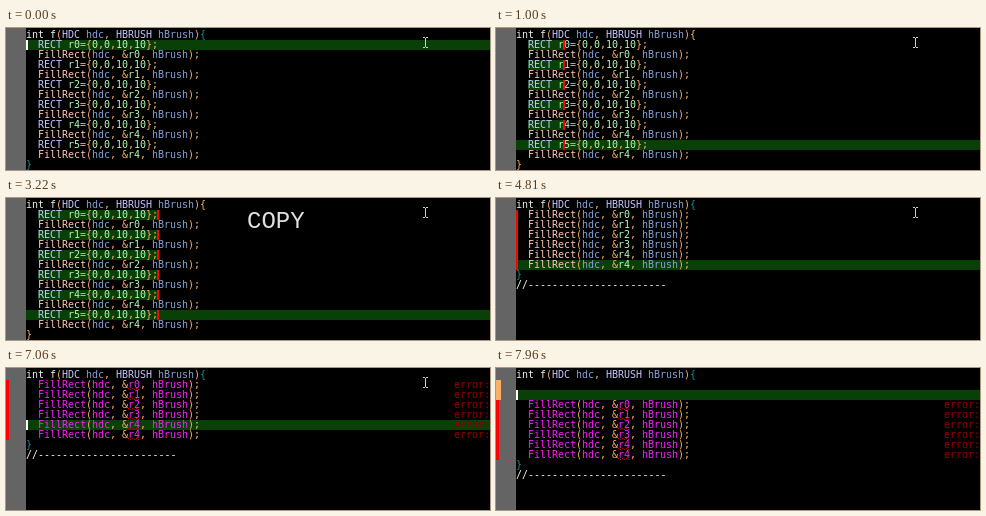
These frames come from a looping animation (484 px wide and 142 px high, 8 s). An HTML page with a canvas:

```html
<!DOCTYPE html>
<html lang="en">
<head>
<meta charset="utf-8">
<title>Multi-caret editing</title>
<style>
html, body { margin: 0; width: 484px; height: 142px; overflow: hidden; background: #000; }
canvas { display: block; }
</style>
</head>
<body>
<canvas id="stage" width="484" height="142"></canvas>
<script>
const ctx = document.getElementById('stage').getContext('2d');
const LOOP = 8000, BEAT = 100, BLINK = 516;
const CW = 6, RH = 10, LEFT = 20, TOP = 2;
const COPY = 1700, CUT = 4810, CHECK = 6000, MOVE = 7060, ENTER = 7660;
const GREEN = '#084008', RED = '#f00', ORANGE = '#f8b068', PINK = '#ffc8b8', LAVENDER = '#c4c4ff',
  WHITE = '#f0f0e8', BLUE = '#86a4d8', MINT = '#b4f8b4', MAGENTA = '#f820f8', TEAL = '#109090';

const head = 'int f(HDC hdc, HBRUSH hBrush){';
const rects = [0, 1, 2, 3, 4, 5].map(i => `  RECT r${i}={0,0,10,10};`);
const fills = [0, 1, 2, 3, 4, 4].map(i => `  FillRect(hdc, &r${i}, hBrush);`);
const tail = ['}', '//' + '-'.repeat(23)];

// Moves from a to b in whole cells, one key press per beat after the start.
function keys(t, start, count, a, b) {
  const pressed = Math.min(count, Math.max(0, Math.floor((t - start) / BEAT)));
  return a + Math.floor((b - a) * pressed / count);
}

function caretAt(t) {
  if (t < CUT) {
    return {
      row: keys(t, 400, 5, 1, 11),
      col: t < BEAT ? 0 : keys(t, BEAT, 3, 2, 6) + keys(t, 900, 7, 0, 16)
    };
  }
  const up = keys(t, MOVE - BEAT, 5, 6, 1);
  return { row: up + blanksAt(t) - keys(t, ENTER + BEAT, 1, 0, 1), col: 0 };
}

const blanksAt = t => keys(t, ENTER - BEAT, 2, 0, 2);
const bracesMatched = t => t < BEAT || (t >= CUT && t < ENTER) || t >= ENTER + 3 * BEAT;
const caretOn = t => t < COPY || t >= MOVE || Math.floor((t - COPY) / BLINK) % 2 === 0;

const fill = (color, x, y, w, h) => {
  ctx.fillStyle = color;
  ctx.fillRect(x, y, w, h);
};
const cells = (color, row, col, count) =>
  fill(color, LEFT + col * CW, TOP + row * RH, count * CW, RH);
const text = (s, x, row, color) => {
  ctx.fillStyle = color;
  ctx.fillText(s, x, row * RH + 10);
};

function tokenColor(word, broken) {
  if (/^(FillRect|hdc|hBrush|r\d)$/.test(word) && broken) return MAGENTA;
  if (/^(hdc|hBrush)$/.test(word)) return BLUE;
  if (/^(RECT|HDC|HBRUSH)$/.test(word)) return LAVENDER;
  if (/^r?\d+$/.test(word)) return MINT;
  if (word === 'FillRect') return PINK;
  return /\w|\/\//.test(word) ? WHITE : ORANGE;
}

function drawLine(line, row, t) {
  const broken = t >= CHECK && line.includes('Fill');
  const scope = (line === head || line === '}') && bracesMatched(t);
  for (const { 0: word, index } of line.matchAll(/\/\/-+|\w+|[^\s\w]/g)) {
    const x = LEFT + index * CW;
    text(word, x, row, scope && /[{}]/.test(word) ? TEAL : tokenColor(word, broken));
    if (broken && /^r\d$/.test(word)) {
      for (let i = 0; i < 12; i += 2) fill('#c00', x + i, row * RH + 10 + i / 2 % 2, 1, 1);
    }
  }
  if (broken) text('error:', 448, row, '#960000');
}

function drawSelection(lines, { row, col }, t) {
  const count = col - 2;
  if (count < 1) return;
  if (count <= 4) {
    const needle = new RegExp('RECT'.slice(0, count), 'g');
    lines.forEach((line, r) => {
      for (const m of line.matchAll(needle)) cells('#980010', r, m.index, count);
    });
  }
  for (let r = 1; r <= row; r += 2) cells(GREEN, r, 2, count);
}

function drawCarets({ row, col }, t) {
  if (!caretOn(t)) return;
  const multi = t >= 500 && t < CHECK;
  const step = t < CUT ? 2 : 1;
  const x = LEFT + col * CW - (col ? 1 : 0);
  for (let r = multi ? 1 : row; r <= row; r += step) {
    fill(multi ? RED : '#fff', x, TOP + r * RH, 2, RH);
  }
}

function drawPointer() {
  const color = '#ccc';
  fill(color, 419, 10, 1, 9);
  for (const y of [9, 19]) {
    fill(color, 417, y, 2, 1);
    fill(color, 420, y, 2, 1);
  }
}

function draw(t) {
  const blanks = blanksAt(t), caret = caretAt(t);
  const body = t < CUT ? rects.flatMap((r, i) => [r, fills[i]]) : fills;
  const lines = [head, ...Array(blanks).fill(''), ...body, ...tail];

  fill('#000', 0, 0, 484, 142);
  fill('#646464', 0, 0, LEFT, 142);
  fill(GREEN, LEFT, TOP + caret.row * RH, 484 - LEFT, RH);
  if (t >= CHECK) {
    fill(ORANGE, 0, 12, 5, blanks * RH);
    fill(RED, 0, 12 + blanks * RH, 3, 60);
  }
  drawSelection(lines, caret, t);

  ctx.font = '10px "DejaVu Sans Mono", monospace';
  lines.forEach((line, r) => drawLine(line, r, t));
  drawCarets(caret, t);
  if (t < MOVE + 5 * BEAT) drawPointer();
  if (t >= COPY && t < 4350) {
    ctx.font = '24px "Liberation Mono", monospace';
    ctx.fillStyle = '#e0e0e0';
    ctx.fillText('COPY', 241, 30);
  }
}

const start = performance.now();
function tick() {
  draw((performance.now() - start) % LOOP);
  requestAnimationFrame(tick);
}
tick();
</script>
</body>
</html>
```
